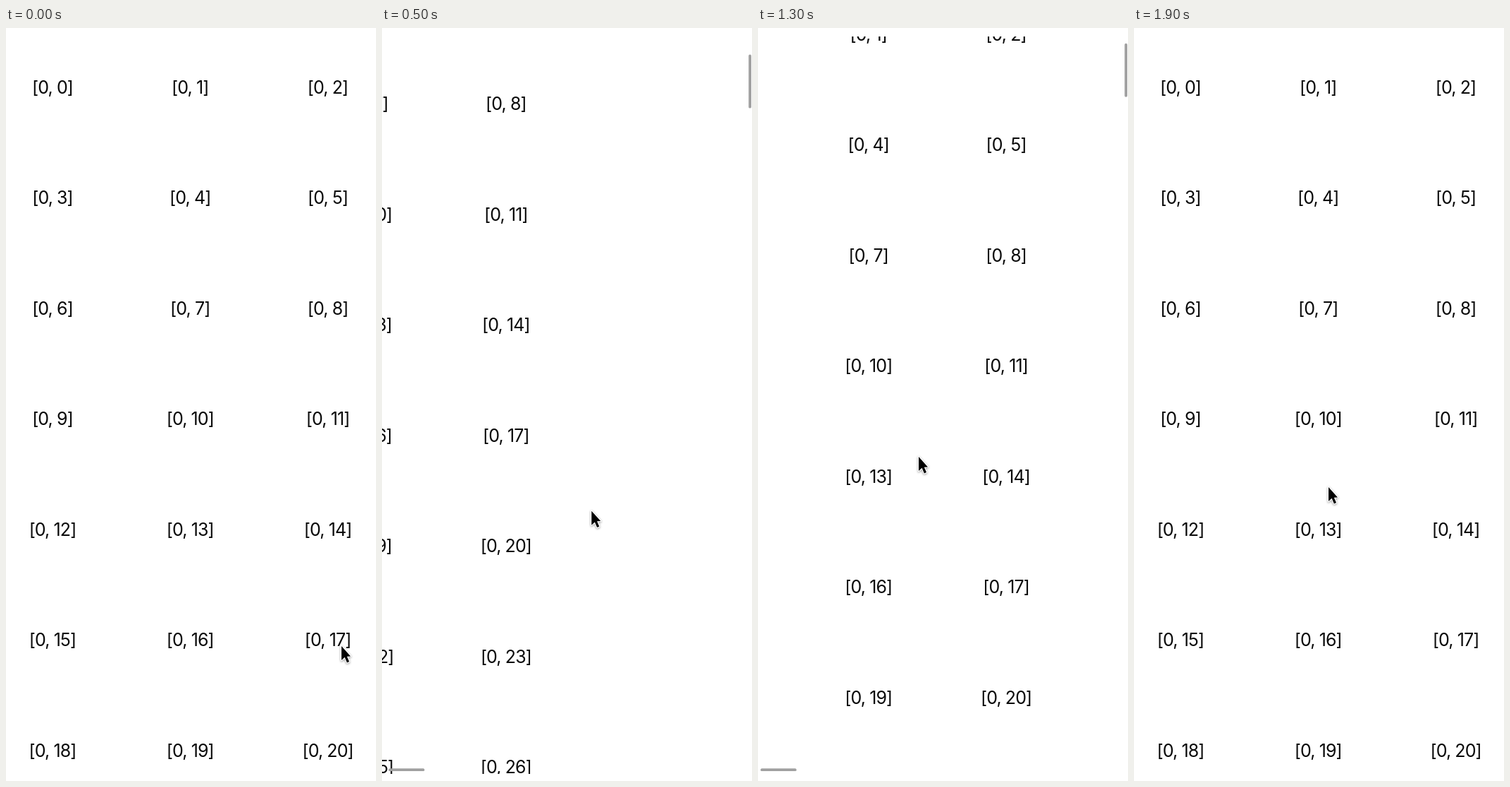
These frames come from a looping animation (525x1066 px, 2 s). An HTML page:

```html
<!DOCTYPE html>
<html lang="en">
<head>
<meta charset="utf-8">
<title>Scrolling grid</title>
<style>
  html, body { margin: 0; width: 100%; height: 100%; overflow: hidden; background: #fff; }
  svg { display: block; width: 100vw; height: 100vh; }
  text {
    font: 400 25px Inter, Roboto, sans-serif;
    letter-spacing: -0.9px;
    text-anchor: middle;
    fill: #0a0a0a;
  }
  #bars rect { fill: #a0a0a0; rx: 1.9px; }
  #cursor { filter: drop-shadow(0 1.5px 1.5px rgba(0, 0, 0, .4)); }
</style>
</head>
<body>
<svg viewBox="0 0 525 1066">
  <clipPath id="view"><rect y="12" width="525" height="1044"/></clipPath>
  <g clip-path="url(#view)"><g id="cells"></g></g>
  <g id="bars">
    <rect id="vbar" x="520.2" width="3.8"/>
    <rect id="hbar" y="1048.3" height="3.8"/>
  </g>
  <path id="cursor" d="M0 1V21L4.6 16.8L7.9 24.4L11 23.1L7.8 15.7L13 15.4Z"
        fill="#000" stroke="#fff" stroke-width="2.4" stroke-linejoin="round" paint-order="stroke"/>
</svg>
<script>
const STEP = 100, STEPS = 20;
const $ = id => document.getElementById(id);

// Key poses: two swipes away, a flick back past the edge, then the bounce.
const keys = [
  { t: 0, scroll: [0, 0], cursor: [476, 874] },
  { t: 3, scroll: [155.5, 173], cursor: [375, 758] },
  { t: 4, scroll: [228, 243], cursor: [331, 713] },
  { t: 7, scroll: [376.5, 349], cursor: [238, 639] },
  { t: 11, scroll: [612, 369], cursor: [125, 602] },
  { t: 13, scroll: [104.5, 75], cursor: [228, 606] },
  { t: 15, scroll: [-23, -33.5], cursor: [246, 660] },
  { t: 18, scroll: [0, 0], cursor: [273, 651] },
  { t: 19, scroll: [0, 0], cursor: [276, 649] }
];

// Smooth curve through the keys that never overshoots them.
function sample(t, value) {
  const slope = i => (value(keys[i + 1]) - value(keys[i])) / (keys[i + 1].t - keys[i].t);
  const tangent = i => {
    if (i === 0 || i === keys.length - 1) return 0;
    const a = slope(i - 1), b = slope(i);
    return a * b > 0 ? 2 * a * b / (a + b) : 0;
  };
  const i = Math.max(0, keys.findIndex(k => k.t >= t) - 1);
  const span = keys[i + 1].t - keys[i].t;
  const u = (t - keys[i].t) / span, v = 1 - u;
  return value(keys[i]) * v * v * (1 + 2 * u) + value(keys[i + 1]) * u * u * (3 - 2 * u)
    + span * u * v * (tangent(i) * v - tangent(i + 1) * u);
}
const point = (t, name) => [0, 1].map(axis => sample(t, k => k[name][axis]));

function addCell(i) {
  const cell = document.createElementNS("http://www.w3.org/2000/svg", "text");
  cell.setAttribute("x", 66 + (i % 3) * 195.3);
  cell.setAttribute("y", 93 + Math.floor(i / 3) * 156.45);
  cell.textContent = `[0, ${i}]`;
  $("cells").append(cell);
}
for (let i = 0; i < 30; i++) addCell(i);

// The thumb shrinks while the content is pulled past its edge.
function setBar(bar, pos, size, start, length, ratio, scroll) {
  bar.setAttribute(pos, start + Math.max(0, scroll) * ratio);
  bar.setAttribute(size, length + Math.min(0, scroll));
}

function draw(now) {
  const n = Math.floor(now / STEP) % STEPS;
  const [sx, sy] = point(n, "scroll");
  const [cx, cy] = point(n, "cursor");
  $("cells").setAttribute("transform", `translate(${-sx} ${-sy})`);
  $("cursor").setAttribute("transform", `translate(${cx} ${cy})`);
  setBar($("vbar"), "y", "height", 16.2, 76, 0.0739, sy);
  setBar($("hbar"), "x", "width", 0.2, 51, 0.0325, sx);
  $("bars").setAttribute("opacity", n > 0 && n < STEPS - 1 ? 1 : 0);
}

let begin;
function tick(now) {
  begin ??= now;
  draw(now - begin);
  requestAnimationFrame(tick);
}
draw(0);
requestAnimationFrame(tick);
</script>
</body>
</html>
```
